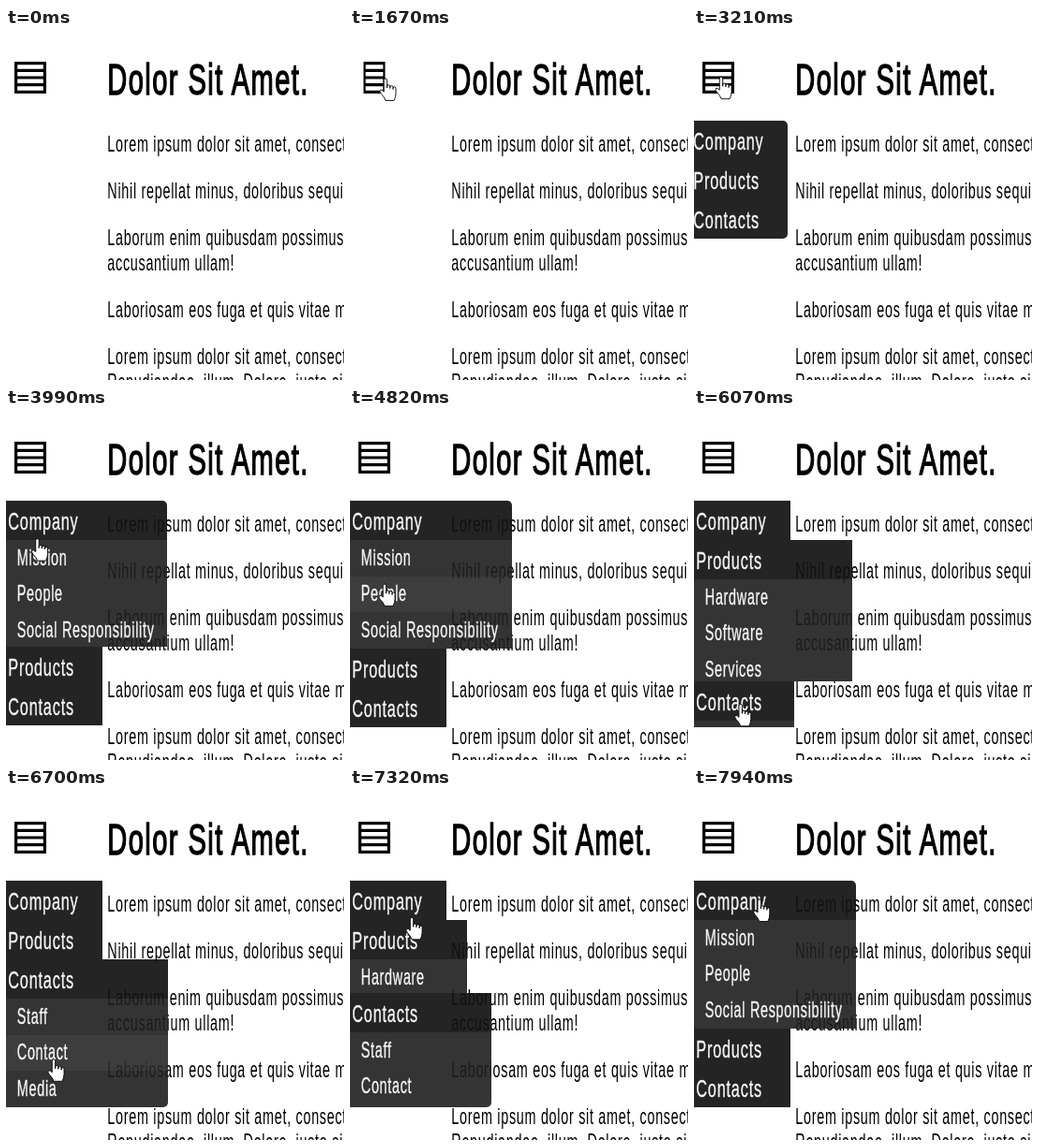
Animation, 361 px wide and 376 px high, one loop 7990 ms. Source, as an HTML page:

```html
<!DOCTYPE html>
<html lang="en">
<head>
<meta charset="utf-8">
<title>Menu</title>
<style>
html, body { margin: 0; width: 100%; height: 100%; overflow: hidden; background: #fff; }
svg { display: block; }
rect { shape-rendering: crispEdges; }
text {
  font-family: "Liberation Sans", Arial, sans-serif;
  letter-spacing: .05em;
  white-space: pre;
}
</style>
</head>
<body>
<svg width="361" height="376" viewBox="0 0 361 376">
  <defs><clipPath id="round"><rect id="clip" x="-10" y="99" rx="5"/></clipPath></defs>
  <g id="page"></g>
  <g id="icon" fill="none" stroke="#000" stroke-width="3.2">
    <path d="M-15.4 -15.4H15.4V15.4H-15.4ZM-16 -7.7H16M-16 0H16M-16 7.7H16"/>
  </g>
  <g id="slide"><g id="menu" clip-path="url(#round)"></g></g>
  <g id="cursor" fill="#fff" stroke="#000" stroke-width=".9" stroke-linejoin="round">
    <path id="arrow" d="M.5 .5V16L4.2 12.6L6.6 18.4L9 17.4L6.6 11.8H11.5Z"/>
    <path id="hand" d="M-1.8 14V1.7a1.7 1.7 0 0 1 3.4 0V10V8.4a1.6 1.6 0 0 1 3.2 0V10.5V9.2a1.6 1.6 0 0 1 3.2 0V11.4V10.4a1.5 1.5 0 0 1 3 0V16Q11 19.5 9 23.5H0Q-1 20 -4.6 16.5Q-7 13.5 -5.7 12.3Q-4 11.2 -1.8 14Z"/>
  </g>
</svg>
<script>
const LOOP = 7990, OPEN_MS = 450;
const TOP = 99, ROW = 42, SUB = 116, ITEM = SUB / 3;
const NARROW = 103, GROW = 70;
const CONDENSE = 0.625; // one narrow face for all type
const $ = id => document.getElementById(id);

function set(el, attrs) {
  for (const k in attrs) el.setAttribute(k, attrs[k]);
}
function add(parent, tag, attrs) {
  const el = document.createElementNS('http://www.w3.org/2000/svg', tag);
  set(el, attrs);
  return parent.appendChild(el);
}
function label(parent, str, x, y, size, fill, weight) {
  add(parent, 'text', {
    transform: `translate(${x} ${y}) scale(${CONDENSE} 1)`,
    'font-size': size, fill, stroke: fill, 'stroke-width': weight
  }).textContent = str;
}

label($('page'), 'Dolor Sit Amet.', 108.3, 70.5, 46.5, '#000', 1.5);
let baseline = 132;
[
  'Lorem ipsum dolor sit amet, consectetur',
  'Nihil repellat minus, doloribus sequi',
  'Laborum enim quibusdam possimus,\naccusantium ullam!',
  'Laboriosam eos fuga et quis vitae magni',
  'Lorem ipsum dolor sit amet, consectetur\nRepudiandae, illum. Dolore, iusto sint'
].forEach(par => {
  for (const line of par.split('\n')) {
    label($('page'), line, 108.3, baseline, 23, '#000', 0);
    baseline += 27;
  }
  baseline += 23;
});

const sections = [
  ['Company', 'Mission', 'People', 'Social Responsibility'],
  ['Products', 'Hardware', 'Software', 'Services'],
  ['Contacts', 'Staff', 'Contact', 'Media']
].map(([title, ...items]) => {
  const g = add($('menu'), 'g', {});
  const row = add(g, 'rect', { height: ROW, fill: 'rgba(18,18,18,.92)' });
  label(g, title, 2.3, 31, 26, '#f6f6f6', 0.4);
  const sub = add(g, 'svg', { y: ROW, overflow: 'hidden' });
  add(sub, 'rect', { width: '100%', height: SUB, fill: 'rgba(30,30,30,.9)' });
  const lit = items.map((s, i) => {
    const r = add(sub, 'rect', { y: i * ITEM, width: '100%', height: ITEM, fill: '#fff' });
    label(sub, s, 11.8, 26.5 + i * ITEM, 23, '#f6f6f6', 0.4);
    return r;
  });
  return { g, row, sub, lit };
});

// [time, section that starts to open]
const hovers = [[3580, 0], [5460, 1], [6000, 2], [7150, 1], [7320, 0]];

// [time, x, y] of the pointer tip
const stops = [
  [350, 265, 319], [1120, 124, 87], [1670, 38, 54], [3400, 28, 52],
  [3620, 32, 118], [4820, 37, 188], [5530, 46, 267], [6100, 50, 319],
  [6450, 50, 319], [6700, 51, 290], [7400, 68, 119], [LOOP, 70, 119]
];

const clamp = v => Math.max(0, Math.min(1, v));
const swing = v => 0.5 - Math.cos(Math.PI * clamp(v)) / 2;

function openness(i, t) {
  return hovers.reduce((v, [t0, who], n) => {
    const end = Math.min(t, n + 1 < hovers.length ? hovers[n + 1][0] : LOOP);
    return v + ((who === i) - v) * swing((end - t0) / OPEN_MS);
  }, 0);
}

function pointer(t) {
  const n = Math.max(1, stops.findIndex(s => s[0] > t));
  const [t0, x0, y0] = stops[n - 1], [t1, x1, y1] = stops[n];
  const k = clamp((t - t0) / (t1 - t0));
  return [x0 + (x1 - x0) * k, y0 + (y1 - y0) * k];
}

function draw(t) {
  const [px, py] = pointer(t);
  const turn = Math.cos(2 * Math.PI * clamp((t - 1500) / 1300));
  set($('icon'), { transform: `translate(26 53) scale(${turn} 1)` });

  const left = 1 - clamp((t - 3000) / 255);
  set($('slide'), {
    transform: `translate(${Math.round(-NARROW * left * left)} 0)`,
    visibility: t < 3000 ? 'hidden' : 'visible'
  });

  let y = TOP, widest = NARROW;
  sections.forEach(({ g, row, sub, lit }, i) => {
    const p = openness(i, t);
    const width = Math.round(NARROW + GROW * p), height = Math.round(SUB * p);
    set(g, { transform: `translate(0 ${y})` });
    set(row, { width });
    set(sub, { width, height });
    lit.forEach((r, n) => {
      const over = Math.floor((py - y - ROW) / ITEM) === n;
      set(r, { opacity: over ? 0.045 : 0 });
    });
    y += ROW + height;
    widest = Math.max(widest, width);
  });
  set($('clip'), { width: widest + 10, height: y - TOP });

  const hand = t >= 1490;
  set($('cursor'), {
    transform: `translate(${px} ${py})`,
    visibility: t < 350 ? 'hidden' : 'visible'
  });
  set($('hand'), { display: hand ? 'inline' : 'none' });
  set($('arrow'), { display: hand ? 'none' : 'inline' });
}

const start = performance.now();
function tick() {
  draw((performance.now() - start) % LOOP);
  requestAnimationFrame(tick);
}
tick();
</script>
</body>
</html>
```
